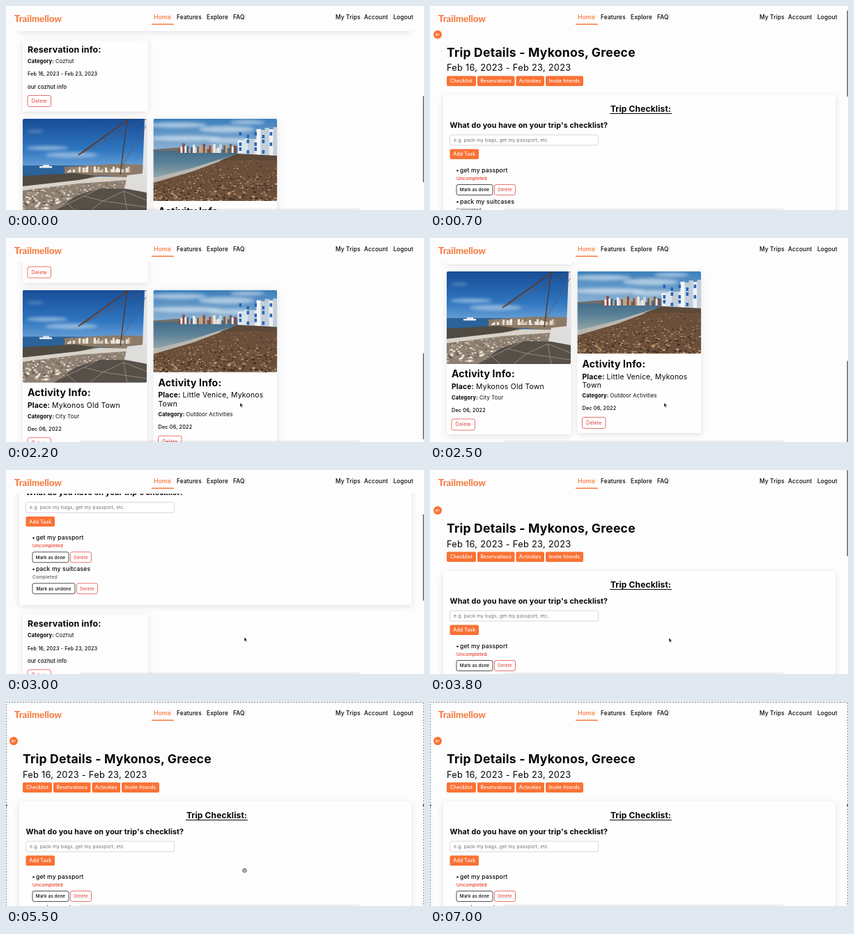
Animation of 600x293 px, one loop 7.1 s. Source, as an HTML page:

```html
<!DOCTYPE html>
<html lang="en">
<head>
<meta charset="utf-8">
<title>Trip details</title>
<style>
  html, body { margin: 0; height: 100%; overflow: hidden; background: #fdfdfd; }
  svg { display: block; width: 100vw; height: 100vh; }
  text { font-family: Inter, "Open Sans", sans-serif; font-weight: 500; letter-spacing: .02em; white-space: pre; }
  .b { font-weight: 700; letter-spacing: .012em; }
  .l { font-weight: 400; letter-spacing: .022em; }
  .mid { text-anchor: middle; }
  .card { fill: #fefefe; filter: drop-shadow(0 2px 4px #0000001c); }
</style>
</head>
<body>
<svg id="stage" viewBox="0 0 600 293" preserveAspectRatio="none"></svg>
<script>
const ORANGE = '#f97235', RED = '#dc3a30', INK = '#050505';

const text = (x, y, size, str, cls = '', fill = INK) =>
  `<text x="${x}" y="${y}" font-size="${size}" class="${cls}" fill="${fill}">${str}</text>`;
const rect = (x, y, w, h, attrs) => `<rect x="${x}" y="${y}" width="${w}" height="${h}" ${attrs}/>`;
const poly = (points, fill) => `<polygon points="${points}" fill="${fill}"/>`;
const line = (d, color, width) => `<path d="${d}" fill="none" stroke="${color}" stroke-width="${width}"/>`;
const card = (x, y, w, h) => rect(x, y, w, h, 'rx="2" class="card"');
const solid = (x, y, w, label) =>
  rect(x, y, w, 14.5, `rx="2" fill="${ORANGE}"`) + text(x + w / 2, y + 9.8, 6.9, label, 'mid', '#fff');
const outline = (x, y, w, h, label, color, size = 6.5) =>
  rect(x, y, w, h, `rx="2.5" fill="#fff" stroke="${color}" stroke-width=".7"`) +
  text(x + w / 2, y + h / 2 + 2.4, size, label, color === RED ? 'l mid' : 'mid', color);
const field = (x, y, size, name, value) =>
  text(x, y, size, `<tspan class="b">${name}:</tspan> <tspan class="l">${value}</tspan>`);

let seed = 7;
const rnd = () => (seed = seed * 16807 % 2147483647) / 2147483647;
const pick = list => list[Math.floor(rnd() * list.length)];

// Scattered pebbles, larger towards the viewer; top(x) limits the area
function stones(n, x0, x1, top, bottom, size, colors) {
  let out = '';
  for (let i = 0; i < n; i++) {
    const x = x0 + rnd() * (x1 - x0), depth = rnd();
    const y = top(x) + depth * (bottom - top(x));
    const r = size * (.5 + depth) * (.6 + rnd() * .6);
    out += `<ellipse cx="${x.toFixed(1)}" cy="${y.toFixed(1)}" rx="${r.toFixed(1)}" ry="${(r * .6).toFixed(1)}" fill="${pick(colors)}"/>`;
  }
  return out;
}

function houses(n, x0, x1, y, low, high, colors) {
  let out = '';
  for (let i = 0; i < n; i++) {
    const h = low + rnd() * (high - low);
    out += rect(x0 + (x1 - x0) * i / n, y - h, (x1 - x0) / n + .4, h, `fill="${pick(colors)}"`);
  }
  return out;
}

const cloud = (x, y, rx, ry, o) =>
  `<ellipse cx="${x}" cy="${y}" rx="${rx}" ry="${ry}" fill="#fff" opacity="${o}" filter="url(#soft)"/>`;

function windmillView() {
  return rect(0, 0, 178, 133, 'fill="url(#sky1)"') +
    cloud(35, 42, 30, 3, .45) + cloud(70, 52, 38, 4, .4) + cloud(18, 18, 12, 2, .25) +
    rect(0, 67, 178, 20, 'fill="#2a6299"') +
    poly('60,69 95,67 130,65 178,66 178,84 60,80', '#8b7a67') +
    houses(34, 64, 156, 77, 2, 9, ['#e9e3da', '#d5c8b8', '#9c8771', '#f3efe9']) +
    rect(24, 68, 18, 2.5, 'fill="#eef2f6"') + rect(29, 66, 9, 2, 'fill="#dfe7ef"') +
    poly('0,86 75,80 110,83 150,82 150,133 0,133', '#8d8072') +
    stones(420, 0, 150, () => 90, 130, 1.8, ['#d9cfc1', '#a39585', '#6b6055', '#c3b5a3', '#ece4d8']) +
    poly('0,82 75,78 105,82 80,89 0,97', '#4f4b42') +
    poly('0,97 80,88 110,83 150,84 150,88 80,93 0,103', '#d9d2c8') +
    poly('45,133 78,110 110,100 178,101 178,133', '#565049') +
    line('M55 127 88 111 115 118 145 104 178 117M88 111 112 99M115 118 96 133M145 104 150 133M115 118 178 127M62 120 77 133', '#a1978a', .8) +
    poly('150,81 178,78 178,106 146,100', '#dedddc') +
    poly('175,0 178,0 178,80 172,80', '#e1e3e6') +
    line('M153 0 80 52', '#5d3b2c', 1.8) + line('M150 0 140 80', '#54382d', 1.4) +
    line('M178 0 80 52M177 10 141 70', '#6d5348', .8);
}

function bayView() {
  const walls = ['#edf0f4', '#dde4ec', '#f6f7f9', '#c3cedb'];
  let out = rect(0, 0, 178, 118, 'fill="url(#sky2)"') +
    cloud(35, 9, 42, 4, .5) + cloud(105, 15, 40, 5, .5) + cloud(45, 28, 52, 4, .5) +
    cloud(135, 5, 25, 3, .5) + cloud(110, 31, 32, 4, .45) +
    rect(0, 44, 178, 40, 'fill="url(#sea)"') +
    poly('0,44 38,41 38,46 0,46', '#756e68') +
    houses(30, 36, 124, 49, 5, 14, ['#f0eeea', '#d8d5d1', '#8f4b40', '#4b6688', '#b9a78f', '#6f6259']) +
    houses(6, 121, 150, 53, 22, 29, walls) + houses(5, 148, 178, 56, 38, 45, walls);
  for (let i = 0; i < 14; i++)
    out += rect(123 + i % 5 * 11, 19 + Math.floor(i / 5) * 11 + i % 2 * 4, 3.6, 5, 'fill="#2868b5"');
  return out +
    poly('0,90 55,74 90,62 120,52 178,55 178,118 0,118', '#6b4f3a') +
    poly('0,85 55,71 90,60 120,51 90,63 55,76 0,92', '#b9b7b0') +
    stones(650, 0, 178, x => Math.max(58, 94 - x * .33), 118, 1.4,
      ['#4d392b', '#a4825f', '#c7a782', '#7d5e45', '#352820', '#92704f']) +
    poly('95,60 121,50 178,53 178,60 118,59', '#5c4939');
}

const photo = (id, x, w, h, content) =>
  `<clipPath id="${id}">${rect(0, 0, w, h, 'rx="2"')}</clipPath>
   <g transform="translate(${x} 474)" clip-path="url(#${id})">${content}</g>`;

const task = (y, name, state, color, action, w) =>
  `<circle cx="39.5" cy="${y - 2.6}" r="1.2"/>` + text(43, y, 8.5, name) +
  text(38, y + 11, 6.6, state, '', color) +
  outline(38, y + 17.5, w, 15, action, INK, 6.3) +
  outline(40.5 + w, y + 17.5, 30, 15, 'Delete', RED);

const gradient = (id, ...colors) =>
  `<linearGradient id="${id}" x2="0" y2="1">${colors.map((c, i) =>
    `<stop offset="${i / (colors.length - 1)}" stop-color="${c}"/>`).join('')}</linearGradient>`;

const page =
  `<circle cx="11" cy="56" r="6" fill="${ORANGE}"/>` + line('M14 56H8.3M10.6 53.6 8.2 56l2.4 2.4', '#fff', .9) +
  text(24, 88.2, 17.6, 'Trip Details - Mykonos, Greece', 'b') +
  text(24, 108.5, 12.8, 'Feb 16, 2023 - Feb 23, 2023', 'l') +
  solid(24, 115.5, 42, 'Checklist') + solid(68, 115.5, 53.5, 'Reservations') +
  solid(123.5, 115.5, 40.5, 'Activities') + solid(166, 115.5, 54, 'Invite friends') +

  card(19, 143, 563, 205) +
  text(302.5, 167.3, 12, 'Trip Checklist:', 'b mid') + rect(258, 169, 89, 1, `fill="${INK}"`) +
  text(28.5, 190, 10.7, "What do you have on your trip's checklist?", 'b') +
  rect(28.5, 200, 213, 15, 'rx="2" fill="#fff" stroke="#c9cdd2" stroke-width=".8"') +
  text(34, 210.1, 6.8, 'e.g. pack my bags, get my passport, etc.', 'l', '#6c7278') +
  solid(28.5, 220.5, 41.5, 'Add Task') +
  task(254, 'get my passport', 'Uncompleted', '#e8341f', 'Mark as done', 52) +
  task(299, 'pack my suitcases', 'Completed', '#5e5e5e', 'Mark as undone', 61) +

  card(24, 361.5, 180, 102) +
  text(31, 378.7, 12.4, 'Reservation info:', 'b') +
  field(31, 393.8, 7.6, 'Category', 'Cozhut') +
  text(31, 412.3, 7.2, 'Feb 16, 2023 - Feb 23, 2023') +
  text(31, 430.6, 7.5, 'our cozhut info') +
  outline(31, 440.5, 33.5, 16, 'Delete', RED, 7) +

  card(24, 474, 178, 234) + photo('photo1', 24, 178, 133, windmillView()) +
  text(31, 626.3, 14.1, 'Activity Info:', 'b') +
  field(31, 643, 10.4, 'Place', 'Mykonos Old Town') +
  field(31, 657.8, 7.6, 'Category', 'City Tour') +
  text(31, 675.8, 7.3, 'Dec 06, 2022') +
  outline(31, 686, 33.5, 16, 'Delete', RED, 7) +

  card(211.5, 474, 177.5, 232) + photo('photo2', 211.5, 177.5, 118, bayView()) +
  text(218.5, 612.3, 14.1, 'Activity Info:', 'b') +
  field(218.5, 628.6, 10.4, 'Place', 'Little Venice, Mykonos') +
  text(218.5, 640.8, 10.4, 'Town', 'l') +
  field(218.5, 654.8, 7.6, 'Category', 'Outdoor Activities') +
  text(218.5, 673.2, 7.3, 'Dec 06, 2022') +
  outline(218.5, 683.5, 33.5, 16, 'Delete', RED, 7);

const nav = [[245, 'Features'], [288, 'Explore'], [326, 'FAQ'], [473, 'My Trips'], [514, 'Account'], [556, 'Logout']];
const header = rect(0, 0, 600, 34, 'fill="#fdfdfd"') +
  `<text x="12" y="23.3" font-size="13.3" fill="${ORANGE}" style="font-family:Lato,sans-serif;font-weight:700;letter-spacing:0">Trailmellow</text>` +
  text(212, 19, 8.7, 'Home', '', ORANGE) + rect(209, 25.5, 32, 1.4, `fill="${ORANGE}"`) +
  nav.map(([x, label]) => text(x, 19.2, 8.3, label)).join('');

const stage = document.getElementById('stage');
stage.innerHTML = `<defs>
  ${gradient('sky1', '#174d97', '#2f76c0', '#93bfe6', '#c0dcf0')}
  ${gradient('sky2', '#3c7fbb', '#82abd0', '#c6d5e2', '#d4e1ec')}
  ${gradient('sea', '#3f6a89', '#5c8298', '#94a6a8')}
  ${gradient('base', '#00000000', '#00000016')}
  <filter id="soft" x="-20%" y="-100%" width="140%" height="300%"><feGaussianBlur stdDeviation="2"/></filter>
  </defs>
  ${rect(0, 0, 600, 293, 'fill="#fdfdfd"')}
  <g id="page">${page}</g>${header}
  ${rect(105, 289.5, 402, 3.5, 'fill="url(#base)"')}
  ${rect(598.5, 0, 1.5, 124, 'id="thumb" rx=".7" fill="#6a6a6a"')}
  <path id="arrow" d="M0 0V6.2L1.5 4.9 2.5 7.1 3.5 6.6 2.5 4.5H4.4Z" fill="#111" stroke="#fff" stroke-width=".5"/>
  <g id="hand"><circle cx="342.5" cy="242" r="2.7" fill="#ddd" stroke="#444" stroke-width=".9"/>
    ${line('M340.8 241.2h3.4M341.4 243h2.2', '#555', .6)}</g>
  <g id="frame">${line('M.5 293V.5H599.5V293', '#8a8a8a', 1).replace('/>', ' stroke-dasharray="2 2"/>')}
    ${rect(0, 147, 1.5, 3, 'fill="#555"')}${rect(598.5, 147, 1.5, 3, 'fill="#555"')}</g>`;

const el = id => document.getElementById(id);
const [pageEl, thumb, arrow, hand, frame] = ['page', 'thumb', 'arrow', 'hand', 'frame'].map(el);
const progress = (t, a, b) => Math.min(1, Math.max(0, (t - a) / (b - a)));
const mix = (a, b, u) => a + (b - a) * u;
const show = (node, on) => node.setAttribute('visibility', on ? 'visible' : 'hidden');

function scrollAt(t) {
  if (t < 1200) return 312 * (1 - progress(t, 0, 1100)) ** 3;
  if (t < 2600) {
    const u = progress(t, 1200, 2380);
    return 426 * u * u * (3 - 2 * u);
  }
  if (t < 3900) return mix(-2, 426, (1 - progress(t, 2600, 3608)) ** 2);
  return mix(-2, 0, progress(t, 3900, 4300));
}

function draw(now) {
  const t = Math.floor(now % 7100 / 100) * 100;
  const y = scrollAt(t);
  pageEl.setAttribute('transform', `translate(0 ${-y})`);
  thumb.setAttribute('y', Math.max(0, y * .414));
  show(thumb, t < 4400);

  const x = 336 + 6 * progress(t, 2500, 3000) + progress(t, 3000, 3800);
  const cy = 236.5 + 3.5 * progress(t, 2500, 3000) + progress(t, 3000, 3800);
  arrow.setAttribute('transform', `translate(${x} ${cy})`);
  show(arrow, t >= 2100 && t < 5300);
  show(hand, t >= 5300 && t < 5900);
  show(frame, t >= 5300);
  requestAnimationFrame(draw);
}
requestAnimationFrame(draw);
</script>
</body>
</html>
```
